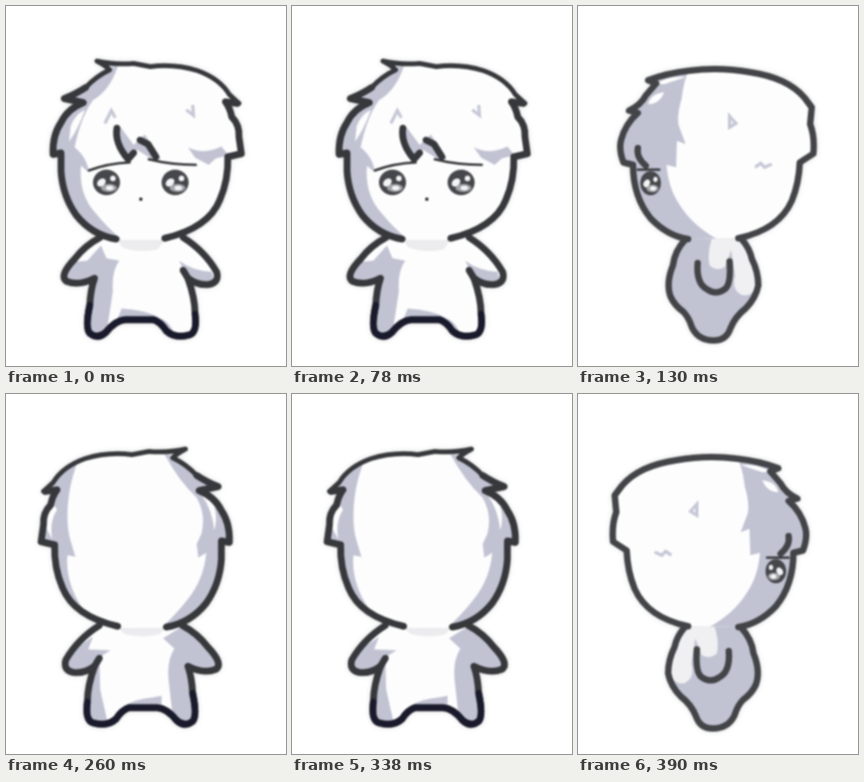
These frames come from a looping animation (351 px wide and 451 px high, 520 ms). An HTML page:

```html
<!DOCTYPE html>
<html lang="en">
<head>
<meta charset="utf-8">
<title>Turning figure</title>
<style>
  html, body { margin: 0; width: 100%; height: 100%; overflow: hidden; background: #fff; }
  svg { display: block; width: 351px; height: 451px; }
  .pose { filter: blur(.8px) drop-shadow(0 0 3px #0002); }
  .line { fill: none; stroke: #37383b; stroke-width: 8.5; stroke-linecap: round; stroke-linejoin: round; }
  .side { stroke: #434447; stroke-width: 8; }
  .thin { stroke-width: 6; }
  .fine { stroke-width: 3; }
  .feet { stroke: #191a2b; }
  .skin { fill: #fdfdfd; }
  .shade { fill: #c1c3d3; }
  .tick { fill: none; stroke: #c6c8d6; stroke-width: 4; }
  .neck { fill: #ececef; }
</style>
</head>
<body>
<svg viewBox="0 0 351 451">
  <defs>
    <!-- Outlines stay open at the neck. -->
    <path id="wideHead" d="M138 292Q108 287 88 262Q71 238 69 207L69 184L59 186Q58 162 69 146Q77 129 97 121L73 116Q88 110 100 102Q113 88 130 80Q124 74 114 69Q136 74 160 72L181 76Q211 72 240 81Q268 91 280 111L292 122L275 120Q281 128 283 139Q293 149 292 164L295 185L278 189Q279 218 268 243Q254 278 199 291"/>
    <path id="wideBody" d="M118 290Q99 300 86 317Q66 338 76 345Q92 351 111 341Q106 355 105 375Q99 403 105 410Q115 418 125 409Q137 394 149 393L185 393Q194 396 201 407Q212 417 230 412Q240 409 237 386Q237 366 228 341Q240 350 253 349Q268 347 264 333Q249 307 222 290"/>
    <path id="sideHead" d="M138 292Q112 288 91 266Q69 239 69 199L57 196Q51 180 54 168Q59 148 75 134L64 131Q79 124 85 112L98 97L88 93Q112 84 140 81Q177 76 216 83Q263 90 284 115L293 127L291 148Q297 164 295 185L278 196Q277 222 268 244Q252 280 201 291"/>
    <path id="sideBody" d="M135 292Q121 307 119 325Q110 347 116 364Q121 375 132 383Q139 390 143 403Q151 419 170 419Q186 419 191 404Q197 389 210 379Q223 366 226 350Q226 333 218 317Q215 303 205 292"/>
    <clipPath id="inWideHead"><use href="#wideHead"/></clipPath>
    <clipPath id="inWideBody"><use href="#wideBody"/></clipPath>
    <clipPath id="inSideHead"><use href="#sideHead"/></clipPath>
    <clipPath id="inSideBody"><use href="#sideBody"/></clipPath>

    <g id="wideLines">
      <path class="line thin" d="M73 116Q88 110 100 102Q113 88 130 80Q124 74 114 69Q136 74 160 72L181 76Q211 72 240 81Q268 91 280 111L292 122"/>
      <path class="line" d="M138 292Q108 287 88 262Q71 238 69 207L69 184L59 186Q58 162 69 146Q77 129 97 121L73 116Q88 110 100 102"/>
      <path class="line" d="M290 122L275 120Q281 128 283 139Q293 149 292 164L295 185L278 189Q279 218 268 243Q254 278 199 291"/>
      <use href="#wideBody" class="line"/>
      <path class="line" d="M228 341L222 331"/>
      <path class="line feet" d="M105 375Q99 403 105 410Q115 418 125 409Q137 394 149 393L185 393Q194 396 201 407Q212 417 230 412Q240 409 237 386"/>
    </g>

    <g id="eye">
      <ellipse rx="17" ry="16" fill="#46474b"/>
      <ellipse cx="3" cy="7" rx="10" ry="5" fill="#a2a3a8"/>
      <g fill="#f4f4f5">
        <ellipse cx="-5" cy="-4" rx="6" ry="4.5" transform="rotate(-40)"/>
        <circle cx="8" cy="-5" r="3.5"/>
        <ellipse cx="4" cy="7" rx="5" ry="3"/>
      </g>
    </g>

    <g id="front">
      <use href="#wideBody" class="skin"/>
      <g clip-path="url(#inWideBody)">
        <path class="shade" d="M70 322L102 319L119 300L126 316L142 319Q132 333 134 357Q130 385 125 414H98L109 350H70Z"/>
        <path class="shade" d="M217 319Q234 332 258 333L262 352L230 345Z"/>
        <path class="shade" d="M139 394L145 379Q177 381 193 391Q208 397 212 416L185 397Z"/>
        <path class="neck" d="M140 293H199L190 305Q164 310 145 302Z"/>
      </g>
      <use href="#wideHead" class="skin"/>
      <g clip-path="url(#inWideHead)">
        <path class="shade" d="M140 76Q130 106 109 118Q94 139 86 177Q102 190 104 209L94 200Q91 235 111 258Q129 280 148 295H90L50 210V140L110 75Z"/>
        <path class="skin" d="M81 151Q86 136 99 130Q91 153 79 170Z"/>
        <path class="shade" d="M134 158L151 196L164 180L185 193L194 191L174 161L160 174L143 151Z"/>
        <path class="shade" d="M228 177Q247 187 270 176L279 187L263 191L254 199L237 190Z"/>
      </g>
      <path class="tick" d="M124 147L132 131L137 140M226 130L235 137L234 124"/>
      <use href="#wideLines"/>
      <path class="line" d="M139 153Q136 172 153 192L160 184M168 168L178 173L188 189"/>
      <path class="line fine" d="M104 206Q128 197 155 196M179 192Q207 199 238 199"/>
      <use href="#eye" x="126" y="221"/>
      <use href="#eye" x="212" y="221"/>
      <circle cx="169" cy="242" r="2.2" fill="#333"/>
    </g>

    <!-- Drawn facing the front, then mirrored. -->
    <g id="back" transform="matrix(-1 0 0 1 339 0)">
      <use href="#wideBody" class="skin"/>
      <g clip-path="url(#inWideBody)">
        <path class="shade" d="M65 350V322L96 305L118 291L142 306L128 319Q138 335 135 360L129 414H98L109 350Z"/>
        <path class="shade" d="M208 321L236 320L230 304L268 330V352L228 346L238 414H211L221 370L222 330Z"/>
        <path class="shade" d="M144 378L154 380Q177 382 191 391L211 416L190 396L144 391Z"/>
        <path class="neck" d="M140 293H199L190 301Q164 307 145 300Z"/>
      </g>
      <use href="#wideHead" class="skin"/>
      <g clip-path="url(#inWideHead)">
        <path class="shade" d="M140 76Q123 108 100 130Q88 151 94 175L100 188L98 205L88 199Q91 232 111 257Q129 280 147 295H90L50 210V140L110 75Z"/>
        <path class="skin" d="M82 132Q89 125 94 126Q80 146 78 171Q72 150 82 132Z"/>
        <path class="shade" d="M245 75Q262 113 262 153Q262 171 258 184L252 204L262 202Q265 237 242 270L228 292L310 240V110Z"/>
        <path class="skin" d="M279 139Q291 150 288 169L281 182Q285 160 275 145Z"/>
      </g>
      <use href="#wideLines"/>
    </g>

    <g id="side">
      <use href="#sideBody" class="shade"/>
      <g clip-path="url(#inSideBody)">
        <path fill="#f0f0f2" d="M170 285H207L230 340Q222 366 205 362Q192 355 197 338L192 306L184 327Q174 333 165 325Q161 309 170 285Z"/>
      </g>
      <use href="#sideHead" class="skin"/>
      <g clip-path="url(#inSideHead)">
        <path class="shade" d="M140 78Q132 95 130 116Q124 135 126 149L135 173L124 169L123 202L111 199Q113 228 128 250Q145 277 180 295H100L45 220V130L85 88Z"/>
        <path class="skin" d="M88 123Q91 110 108 108Q102 123 88 123ZM98 97Q115 87 135 89L108 98Z"/>
      </g>
      <path class="tick" d="M190 138L198 147L190 152ZM222 202L229 197L234 202L243 198"/>
      <use href="#sideHead" class="line side"/>
      <use href="#sideBody" class="line side"/>
      <path class="line side" d="M150 322Q148 348 162 355Q173 363 185 354Q192 347 190 320M75 178Q73 190 85 200"/>
      <path class="line fine" d="M75 205H102"/>
      <use href="#eye" transform="translate(91 222) scale(.76 .94)"/>
    </g>
  </defs>

  <g class="pose"><use href="#front"/></g>
  <g class="pose"><use href="#side"/></g>
  <g class="pose"><use href="#back"/></g>
  <g class="pose"><use href="#side" transform="matrix(-1 0 0 1 339 0)"/></g>
</svg>
<script>
  const STEP = 130;
  const poses = document.querySelectorAll('.pose');

  function draw() {
    const current = Math.floor(performance.now() / STEP) % poses.length;
    poses.forEach((pose, i) => pose.style.display = i === current ? '' : 'none');
    requestAnimationFrame(draw);
  }
  draw();
</script>
</body>
</html>
```
